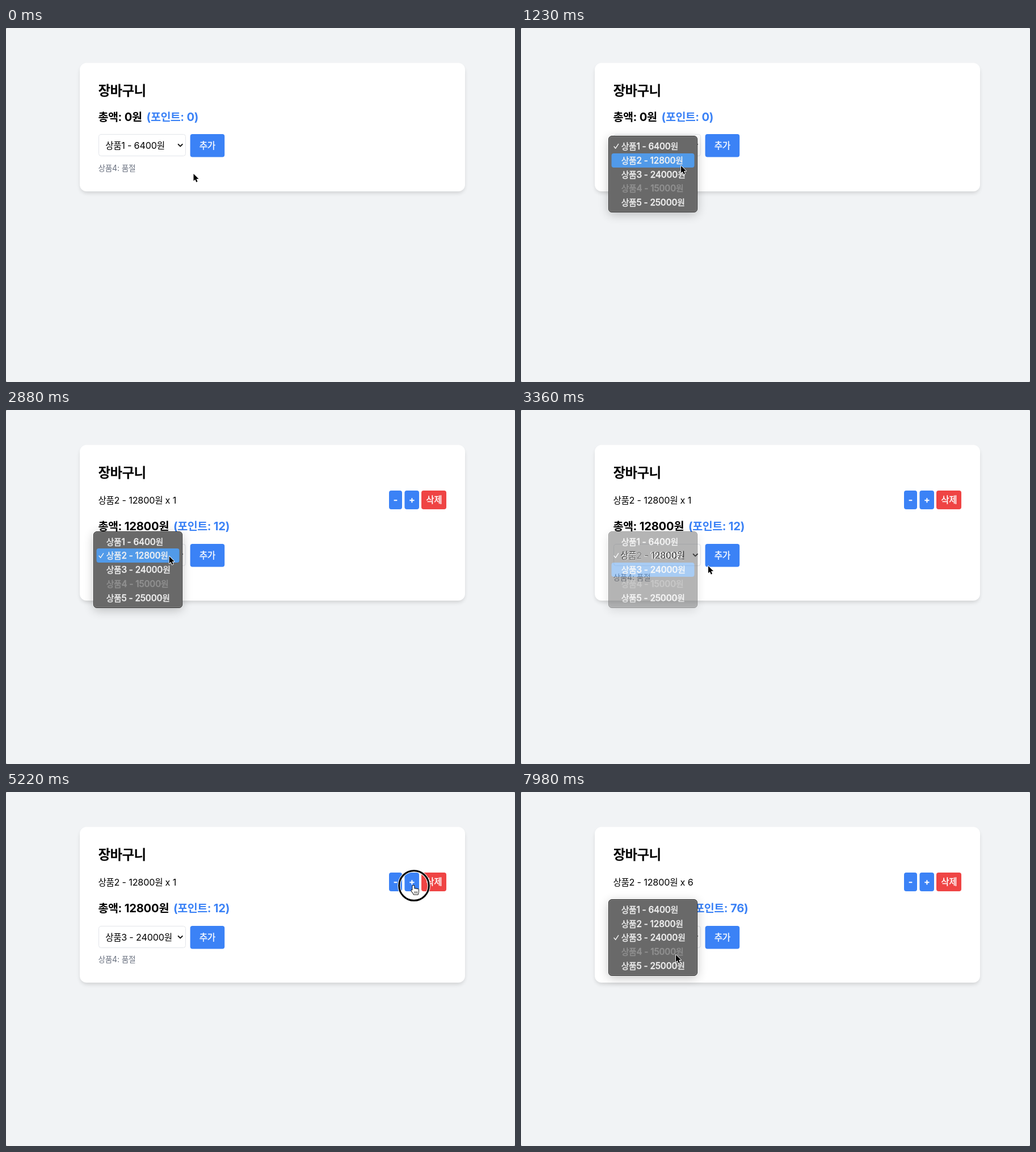
Write an HTML page with a canvas that moves like this. It is 897 px wide and 624 px high and loops after 8 s.

```html
<!DOCTYPE html>
<html lang="ko">
<head>
<meta charset="utf-8">
<title>장바구니</title>
<style>
html, body { margin: 0; width: 100%; height: 100%; overflow: hidden; background: #f1f3f5; }
canvas { display: block; }
</style>
</head>
<body>
<canvas id="stage" width="897" height="624"></canvas>
<script>
const LOOP = 8000, W = 897, H = 624;
const BLUE = '#3b82f6', RED = '#ef4444', PALE = '#f2f2f2';
const UNIT = 16.16, LEFT = 162.6, ROW = 2.5 * UNIT, FIRST_ROW = 48.2;
const PRICES = [6400, 12800, 24000, 15000, 25000];
const SOLD_OUT = 3, MENU_STEP = 24.7, RING_TIME = 120;

const stage = document.getElementById('stage').getContext('2d');
const layer = Object.assign(document.createElement('canvas'), { width: W, height: H }).getContext('2d');
let g = stage;

// Each gesture eases the pointer to a point and may click there afterwards.
const START = { x: 330.5, y: 257 };
const GESTURES = [
  { from: 0, to: 390, x: 294, y: 210, click: 420 },
  { from: 840, to: 1200, x: 282, y: 243, click: 1270 },
  { from: 1380, to: 1620, x: 341, y: 217, click: 1950 },
  { from: 2070, to: 2160, x: 323, y: 215 },
  { from: 2160, to: 2360, x: 288, y: 256, click: 2400 },
  { from: 2850, to: 3030, x: 284, y: 281, click: 3080 },
  { from: 3200, to: 3360, x: 330, y: 275 },
  { from: 3360, to: 3540, x: 337, y: 238, click: 3570 },
  { from: 4020, to: 4350, x: 694, y: 203, click: 4380 },
  { from: 4830, to: 5070, x: 718, y: 165, click: 5200 },
  { from: 6600, to: 6780, x: 700, y: 164 },
  { from: 6780, to: 6960, x: 717, y: 163 },
  { from: 6960, to: 7050, x: 741, y: 164 },
  { from: 7470, to: 7680, x: 273, y: 255, click: 7740 },
  { from: 7830, to: 7980, x: 273, y: 287 }
];
// The n-th menu opens with option n chosen and fades after the pick.
const MENUS = [
  { open: 570, pick: 1350 },
  { open: 2520, pick: 3200 },
  { open: 7860, pick: Infinity }
].map((m, chosen) => ({ ...m, chosen, fade: m.pick + 70, close: m.pick + 250 }));
const ADDED = [2040, 5310, 5520, 5760, 6000, 6390];
const SECOND_ROW = [3690, 4470];

const label = i => `상품${i + 1} - ${PRICES[i]}원`;
const within = (t, [a, b]) => t >= a && t < b;

function ease(p) {
  p = Math.min(1, Math.max(0, p));
  return p * p * (3 - 2 * p);
}

function pointer(t) {
  let { x, y } = START;
  for (const m of GESTURES) {
    const e = ease((t - m.from) / (m.to - m.from));
    x += (m.x - x) * e;
    y += (m.y - y) * e;
  }
  return { x, y };
}

function layout(t) {
  const count = ADDED.filter(a => t >= a).length;
  const second = within(t, SECOND_ROW);
  return {
    count, second,
    shift: (count ? FIRST_ROW : 0) + (second ? ROW : 0),
    total: count * PRICES[1] + (second ? PRICES[2] : 0),
    chosen: MENUS.filter(m => t >= m.close).length
  };
}

function box(x, y, w, h, r, fill, stroke) {
  g.beginPath();
  g.roundRect(x, y, w, h, r);
  if (fill) { g.fillStyle = fill; g.fill(); }
  if (stroke) { g.strokeStyle = stroke; g.lineWidth = 1; g.stroke(); }
}

function shadowBox(x, y, w, h, r, fill, dy, blur, alpha) {
  g.save();
  g.shadowColor = `rgba(0,0,0,${alpha})`;
  g.shadowOffsetY = dy;
  g.shadowBlur = blur;
  box(x, y, w, h, r, fill);
  g.restore();
}

// Draws Hangul and Latin runs with their own fonts; returns the end x.
function text(str, x, y, size, weight, color) {
  g.fillStyle = g.strokeStyle = color;
  g.lineWidth = 0.35;
  for (const run of str.match(/[가-힣]+|[^가-힣]+/g)) {
    const hangul = /[가-힣]/.test(run);
    const px = hangul ? size * 0.97 : size;
    const family = hangul ? '"Noto Sans CJK KR", "Noto Sans CJK"' : 'Inter';
    g.font = `${weight} ${px}px ${family}, sans-serif`;
    g.letterSpacing = `${px * (hangul ? -0.028 : -0.01)}px`;
    g.fillText(run, x, y);
    if (weight === 500) g.strokeText(run, x, y);
    x += g.measureText(run).width;
  }
  return x;
}

function line(points, width, color) {
  g.beginPath();
  points.forEach(([x, y]) => g.lineTo(x, y));
  g.lineWidth = width;
  g.strokeStyle = color;
  g.lineCap = g.lineJoin = 'round';
  g.stroke();
}

function button(hits, x, y, w, h, str, pad, color) {
  box(x, y, w, h, 4, color);
  text(str, x + pad, y + h / 2 + 5.7, UNIT, 500, '#fff');
  hits.push({ x, y, w, h, kind: 'hand' });
}

function cartRow(hits, y, item, count) {
  const end = text(`${label(item)} x ${count}`, LEFT, y + 22.5, UNIT, 400, '#000');
  hits.push({ x: LEFT, y: y + 6, w: end - LEFT, h: 22, kind: 'beam' });
  button(hits, 675, y, 23, 33, '-', 7.7, BLUE);
  button(hits, 702.4, y, 25.6, 33, '+', 7.5, BLUE);
  button(hits, 732, y, 44, 33, '삭제', 8.2, RED);
}

function page({ count, second, shift, total, chosen }) {
  const hits = [];
  const height = Math.round(288 + shift) - 61.5;
  shadowBox(131, 63, 677, height - 2.5, 12, '#fff', 4, 7, 0.14);
  box(130, 61.5, 679, height, 12, '#fff');
  text('장바구니', LEFT, 119.2, 1.5 * UNIT, 700, '#000');

  if (count) cartRow(hits, 142, 1, count);
  if (second) cartRow(hits, 142 + ROW, 2, 1);

  const base = 163.9 + shift;
  let end = text(`총액: ${total}원`, LEFT, base, 1.25 * UNIT, 700, '#000');
  end = text(`(포인트: ${Math.floor(total / 1000)})`, end + 8, base, 1.25 * UNIT, 700, BLUE);
  hits.push({ x: LEFT, y: base - 20, w: end - LEFT, h: 26, kind: 'beam' });

  const y = Math.round(187.4 + shift);
  box(163.5, y + 0.5, 153, 38, 4, '#fff', '#e2e5ea');
  text(label(chosen), 175.2, y + 25.5, UNIT, 400, '#000');
  line([[303.6, y + 18], [307.2, y + 21.6], [310.8, y + 18]], 1.8, '#111');
  button(hits, 324.6, y, 60.6, 40.4, '추가', UNIT, BLUE);
  text('상품4: 품절', LEFT, 251.6 + shift, 0.875 * UNIT, 400, '#6b7280');
  return hits;
}

// The chosen option lies over the closed select box.
function menu({ chosen, pick, fade, close }, shift, t) {
  g = layer;
  g.clearRect(0, 0, W, H);
  const x = 154.5, first = 208.4 + shift - chosen * MENU_STEP;
  const y = Math.round(first - 18.4) + 0.5;
  shadowBox(x, y, 156, 134, 6, '#696969', 4, 18, 0.24);
  box(x, y, 156, 134, 5.5, '#696969', '#2c2c2c');
  box(x + 1, y + 1, 154, 132, 4.5, null, '#808080');

  const hover = Math.round((pointer(Math.min(t, pick)).y - first) / MENU_STEP);
  PRICES.forEach((_, i) => {
    const mid = first + i * MENU_STEP;
    if (i === hover && i !== SOLD_OUT) box(159.5, Math.round(mid - 12.6), 146, 25, 4, '#519ae9');
    text(label(i), 176.8, mid + 5.8, 15.4, 500, i === SOLD_OUT ? '#929292' : PALE);
    if (i === chosen) line([[164, mid + 0.6], [166.6, mid + 3.8], [171.6, mid - 3.8]], 1.5, PALE);
  });

  g = stage;
  g.globalAlpha = t < fade ? 1 : 1 - (t - fade) / (close - fade);
  g.drawImage(layer.canvas, 0, 0);
  g.globalAlpha = 1;
}

const ARROW = new Path2D('M0 0V13.2L3 10.4L5.1 15.4L7.4 14.4L5.3 9.6H9.5Z');
const HAND = new Path2D('M-1.6 8V1.2a1.5 1.5 0 0 1 3 0V6a1.4 1.3 0 0 1 2.7 .3a1.3 1.3 0 0 1 2.5 .5' +
  'a1.2 1.2 0 0 1 2.3 .8v3.4c0 2-1 2.6-1 4.5h-7.4c-.4-2.2-3-4-4-6.2c-.5-1.4 1-2.2 1.9-.9z');
const FINGERS = new Path2D('M2 10.5V13.5M4.2 10.5V13.5M6.4 10.5V13.5');
const BEAM = new Path2D('M-3 -7Q0 -7 0 -5Q0 -7 3 -7M0 -5V5M-3 7Q0 7 0 5Q0 7 3 7M-1.5 2H1.5');

function outline(path, width, color) {
  g.lineWidth = width;
  g.strokeStyle = color;
  g.stroke(path);
}

function cursor(kind, { x, y }) {
  g.save();
  g.translate(x, y);
  g.lineJoin = 'round';
  if (kind === 'beam') {
    outline(BEAM, 2.4, 'rgba(255,255,255,.7)');
    outline(BEAM, 1.1, '#111');
  } else if (kind === 'hand') {
    outline(HAND, 1.9, '#111');
    g.fillStyle = '#fff';
    g.fill(HAND);
    outline(FINGERS, 0.8, '#111');
  } else {
    g.scale(0.95, 0.95);
    outline(ARROW, 1.8, '#fff');
    g.fillStyle = '#000';
    g.fill(ARROW);
  }
  g.restore();
}

function ring({ x, y }) {
  const circle = new Path2D();
  circle.arc(x + 1, y, 26.3, 0, Math.PI * 2);
  outline(circle, 5, '#fff');
  outline(circle, 3, '#000');
}

function draw(t) {
  g.fillStyle = '#8b8d8f';
  g.fillRect(0, 0, W, H);
  box(0, 0, W, H, 2, '#f1f3f5');

  const state = layout(t);
  const hits = page(state);
  const open = MENUS.find(m => within(t, [m.open, m.close]));
  if (open) menu(open, state.shift, t);

  const p = pointer(t);
  const hit = hits.find(h => within(p.x, [h.x, h.x + h.w]) && within(p.y, [h.y, h.y + h.h]));
  if (GESTURES.some(m => within(t, [m.click, m.click + RING_TIME]))) ring(p);
  cursor(open || !hit ? 'arrow' : hit.kind, p);
}

function tick() {
  draw(performance.now() % LOOP);
  requestAnimationFrame(tick);
}
tick();
</script>
</body>
</html>
```
